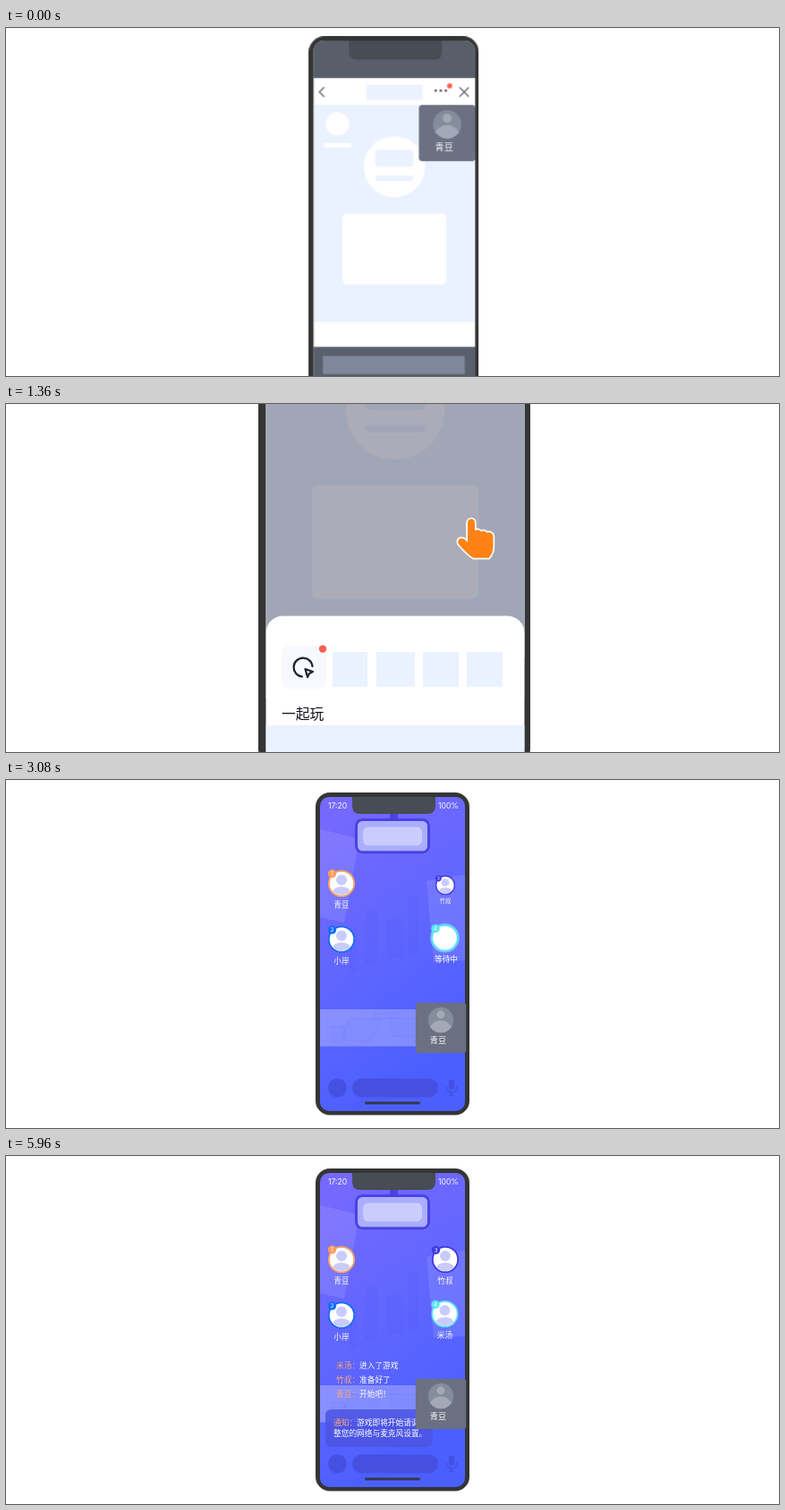
These frames come from a looping animation (864x390 px, 6000 ms). An HTML page:

```html
<!DOCTYPE html>
<html lang="zh">
<head>
<meta charset="utf-8">
<title>一起玩</title>
<style>
html, body { margin: 0; width: 100%; height: 100%; overflow: hidden; background: #fff; }
svg { display: block; width: 864px; height: 390px; }
text { font-family: "Noto Sans CJK SC", "Noto Sans CJK", sans-serif; }
.mid { text-anchor: middle; }
.small { font-size: 8.7px; fill: #fff; }
.name { fill: #ffa67c; }
.latin { font-family: Inter, Roboto, sans-serif; }
.pale { fill: #eaf2ff; }
.white { fill: #fff; }
.line { fill: none; stroke: #686b7d; stroke-width: 2.5; stroke-linecap: round; }

/* one loop is 6 s, so 1% is 60 ms */
.a { animation: 6s linear infinite both; }
#page { animation-name: page; }
#shade { animation-name: shade; }
#sheet { animation-name: sheet; }
#hand { animation-name: hand; }
#tap { animation-name: tap; transform-origin: 521px 128px; }
#game { animation-name: game; }
#seat3 { animation-name: seat3; transform-origin: 491px 123px; }
#wait { animation-name: wait; }
#seat4 { animation-name: seat4; transform-origin: 491px 177px; }
#bubble { animation-name: bubble; transform-origin: 473px 176.5px; }
#log { animation-name: log; }
#say1 { animation-name: say1; }
#say2 { animation-name: say2; }
#say3 { animation-name: say3; }
#say4 { animation-name: say4; }
#notice { animation-name: notice; }

@keyframes page {
  0% { transform: translate(162.1px, -9px) scale(.625); opacity: 1; animation-timing-function: ease-in-out; }
  7% { transform: translate(0, 0) scale(1); }
  16% { transform: translate(0, 0) scale(1); animation-timing-function: ease-in-out; }
  22%, 34% { transform: translate(0, -256px) scale(1); animation-timing-function: ease-in-out; }
  36.6%, 41.333% { transform: translate(0, -307px) scale(1); animation-timing-function: linear; }
  46.6% { opacity: 1; }
  46.667%, 100% { transform: translate(186.45px, -2.41px) scale(.5658); opacity: 0; }
}
@keyframes shade { 0%, 16% { opacity: 0; } 21%, 100% { opacity: 1; } }
@keyframes sheet {
  0%, 16% { transform: translateY(180px); animation-timing-function: ease-out; }
  22%, 100% { transform: none; }
}
@keyframes hand {
  0%, 5.5% { transform: translate(0, 70px); opacity: 0; animation-timing-function: ease-out; }
  10.6%, 23.333% { transform: translate(0, 0); opacity: 1; }
  34% { transform: translate(-130px, 98px); }
  36.667% { transform: translate(-168px, 111px); }
  41.333% { transform: translate(-168px, 111px); opacity: 1; }
  43%, 100% { transform: translate(-168px, 111px); opacity: 0; }
}
@keyframes tap {
  0%, 12.67% { transform: scale(.4); opacity: 0; }
  13.333% { transform: scale(1); opacity: 1; }
  16% { transform: scale(1.3); opacity: 0; }
  37.2% { transform: scale(.4); opacity: 0; }
  38% { transform: scale(1); opacity: 1; }
  41%, 100% { transform: scale(1.3); opacity: 0; }
}
@keyframes game {
  0%, 41.333% { transform: translate(-329.5px, -302.7px) scale(1.7674); }
  42% { opacity: 0; }
  0% { opacity: 0; }
  45%, 100% { opacity: 1; }
  46.667%, 100% { transform: translate(0, 0) scale(1); }
}
@keyframes seat3 { 0%, 48.667% { transform: scale(0); } 52.333%, 100% { transform: scale(1); } }
@keyframes wait { 0%, 60% { opacity: 1; } 62%, 100% { opacity: 0; } }
@keyframes seat4 {
  0%, 60% { transform: scale(.5); opacity: 0; }
  63.5%, 100% { transform: scale(1); opacity: 1; }
}
@keyframes bubble {
  0%, 61.5% { transform: scale(0); opacity: 0; }
  64.5%, 81% { transform: scale(1); opacity: 1; }
  83.5%, 100% { transform: scale(1); opacity: 0; }
}
@keyframes log {
  0%, 52.7% { transform: translateY(61px); animation-timing-function: ease-out; }
  57.5%, 64% { transform: translateY(32.4px); }
  68%, 71.3% { transform: translateY(16.2px); }
  75%, 77.4% { transform: translateY(0); }
  80.5%, 82.7% { transform: translateY(-16.3px); }
  87.5%, 100% { transform: translateY(-42.5px); }
}
@keyframes say1 { 0%, 52.7% { opacity: 0; } 56%, 75.5% { opacity: 1; } 80%, 100% { opacity: 0; } }
@keyframes say2 { 0%, 64% { opacity: 0; } 67%, 100% { opacity: 1; } }
@keyframes say3 { 0%, 71.3% { opacity: 0; } 74.5%, 100% { opacity: 1; } }
@keyframes say4 { 0%, 76% { opacity: 0; } 80%, 100% { opacity: 1; } }
@keyframes notice {
  0%, 82.7% { transform: translateY(45px); opacity: 0; animation-timing-function: ease-out; }
  87.5%, 100% { transform: none; opacity: 1; }
}
</style>
</head>
<body>
<svg viewBox="0 0 864 390" xmlns="http://www.w3.org/2000/svg">
<defs>
  <linearGradient id="sky" x1="0" y1="0" x2=".35" y2="1">
    <stop offset="0" stop-color="#7869fd"/>
    <stop offset=".55" stop-color="#6066ff"/>
    <stop offset="1" stop-color="#4b5fff"/>
  </linearGradient>
  <clipPath id="pageClip"><rect x="290.5" y="37" width="289" height="626" rx="19"/></clipPath>
  <clipPath id="gameClip"><rect x="351" y="19" width="162" height="352" rx="10"/></clipPath>
  <clipPath id="faceClip"><circle r="25.5"/></clipPath>
  <clipPath id="seatClip"><circle r="13"/></clipPath>
  <g id="person" fill="#c9ccfb" clip-path="url(#seatClip)">
    <circle cy="-4" r="6"/>
    <ellipse cy="9" rx="9.5" ry="5.5"/>
  </g>
  <g id="card">
    <rect x="-50.5" y="-35" width="101" height="101" rx="6" fill="#6b7082"/>
    <circle r="25.5" fill="#858c9b"/>
    <g fill="#a3a9b7" clip-path="url(#faceClip)">
      <circle cy="-11" r="8"/>
      <circle cy="25" r="24"/>
    </g>
    <text class="mid white" x="-5.5" y="47" font-size="16.5">青豆</text>
  </g>
</defs>

<g id="page" class="a">
  <rect x="282" y="29" width="304" height="642" rx="28" fill="#343535"/>
  <g clip-path="url(#pageClip)">
    <rect class="white" x="290" y="37" width="290" height="627"/>
    <rect x="290" y="37" width="290" height="67" fill="#595f6a"/>
    <path d="M354 37h166v20q0 14-14 14H368q-14 0-14-14z" fill="#464d54"/>
    <path class="line" d="M309 121l-8 8 8 8M552.5 121.500l15 15m0-15l-15 15"/>
    <rect class="pale" x="385" y="116" width="100" height="27"/>
    <g fill="#555866"><circle cx="509" cy="126.500" r="2.300"/><circle cx="518" cy="126.500" r="2.300"/><circle cx="527" cy="126.500" r="2.300"/></g>
    <circle cx="534" cy="118" r="4.500" fill="#ff5f52"/>
    <rect class="pale" x="292" y="152" width="288" height="389"/>
    <g class="white">
      <circle cx="333" cy="186" r="21"/>
      <rect x="308" y="220" width="50" height="8.500" rx="4"/>
      <circle cx="435" cy="263" r="55"/>
      <rect x="342" y="347" width="186" height="127" rx="7"/>
    </g>
    <rect class="pale" x="401" y="233" width="68" height="30" rx="7"/>
    <rect class="pale" x="401" y="279" width="68" height="9" rx="4.500"/>
    <rect x="290" y="586" width="290" height="80" fill="#595f6c"/>
    <rect x="307" y="602" width="254" height="33" rx="2" fill="#7f889b"/>
    <use href="#card" x="529.500" y="187"/>
    <rect id="shade" class="a" x="290" y="37" width="290" height="627" fill="#585a71" fill-opacity=".5"/>
    <g id="sheet" class="a">
      <rect class="white" x="290.500" y="493.500" width="289" height="190" rx="19"/>
      <rect class="pale" x="290" y="616" width="290" height="50"/>
      <rect x="308" y="527" width="50" height="48" rx="8" fill="#f7f9fe"/>
      <g class="pale">
        <rect x="365" y="534" width="39" height="39"/><rect x="414" y="534" width="43" height="39"/>
        <rect x="466" y="534" width="40" height="39"/><rect x="515" y="534" width="40" height="39"/>
      </g>
      <g fill="none" stroke="#1e2030" stroke-width="2.200" stroke-linejoin="round" stroke-linecap="round">
        <path d="M331 561.500A10.500 10.500 0 1 1 342.500 550"/>
        <path d="M334.500 553l8.500 3-4 2-2 4z"/>
      </g>
      <circle cx="354" cy="530.500" r="4.200" fill="#ff5f52"/>
      <text x="308" y="609" font-size="15.800" font-weight="500" fill="#11131c">一起玩</text>
    </g>
  </g>
</g>

<g id="game" class="a">
  <rect x="346" y="14" width="172" height="361.500" rx="16" fill="#343535"/>
  <g clip-path="url(#gameClip)">
    <rect x="351" y="19" width="162" height="352" fill="url(#sky)"/>
    <g fill="#fff" fill-opacity=".1">
      <path d="M351 55l44 11-17 94-27-6z"/>
      <path d="M470 113l43-7v96l-35 2z"/>
    </g>
    <g fill="#4a50f0" fill-opacity=".16">
      <path d="M384 167h8v48h-8zM401 146h14v60h-14zM426 155h18v44h-18zM450 130h10v66h-10z"/>
    </g>
    <path d="M387 19h93v10q0 9-9 9H396q-9 0-9-9z" fill="#464d54"/>
    <g class="latin" font-size="8.600" fill="#fff">
      <text class="latin" x="360" y="31.500">17:20</text>
      <text class="latin" x="483" y="31.500">100%</text>
    </g>
    <rect x="429" y="38" width="9" height="7" fill="#4a42e0"/>
    <rect x="391.500" y="44.500" width="81" height="36.500" rx="7" fill="#aaaefc" stroke="#4a42e4" stroke-width="3"/>
    <rect x="399" y="52.500" width="66" height="21" rx="6" fill="#caccfd"/>

    <g transform="translate(375 116)">
      <circle r="14.200" fill="#fff" stroke="#ff9d5f" stroke-width="1.800"/><use href="#person"/>
      <circle cx="-10.500" cy="-11" r="4.700" fill="#ff9d5f"/>
      <text class="mid white latin" x="-10.500" y="-8.700" font-size="6">1</text>
      <text class="mid small" y="27">青豆</text>
    </g>
    <g transform="translate(375 178.500)">
      <circle r="14.200" fill="#fff" stroke="#146cf5" stroke-width="1.800"/><use href="#person"/>
      <circle cx="-10.500" cy="-10.500" r="4.700" fill="#146cf5"/>
      <text class="mid white latin" x="-10.500" y="-8.200" font-size="6">2</text>
      <text class="mid small" y="27">小岸</text>
    </g>
    <g id="seat3" class="a"><g transform="translate(491 116)">
      <circle r="14.200" fill="#fff" stroke="#4038e2" stroke-width="1.800"/><use href="#person"/>
      <circle cx="-10.500" cy="-10.500" r="4.700" fill="#4038e2"/>
      <text class="mid white latin" x="-10.500" y="-8.200" font-size="6">3</text>
      <text class="mid small" y="27">竹叔</text>
    </g></g>
    <g transform="translate(490.500 177)">
      <circle r="14.200" fill="#fff" stroke="#5be4f2" stroke-width="1.800"/>
      <circle cx="-10.500" cy="-10.500" r="4.700" fill="#5be4f2"/>
      <text class="mid white latin" x="-10.500" y="-8.200" font-size="6">4</text>
    </g>
    <g id="wait" class="a">
      <circle cx="490.500" cy="177" r="15.500" fill="none" stroke="#7df0fa" stroke-opacity=".5" stroke-width="2"/>
      <text class="mid small" x="492" y="203.500">等待中</text>
    </g>
    <g id="seat4" class="a">
      <use href="#person" x="490.500" y="177"/>
      <text class="mid small" x="490.500" y="203.500">米汤</text>
    </g>
    <g id="bubble" class="a">
      <path d="M435 168.500h32q3 0 3 3v3l3 2-3 2v3q0 3-3 3h-32q-3 0-3-3v-10q0-3 3-3z" fill="#61e4f3"/>
      <text class="mid" x="451" y="179.500" font-size="8" fill="#1d2b57">进入游戏</text>
    </g>

    <rect x="351" y="257" width="162" height="41.500" fill="#fff" fill-opacity=".28"/>
    <g fill="#7f8bff" fill-opacity=".35" stroke="#6c78f5" stroke-opacity=".35">
      <path d="M384 267l36 1-13 25-33-2zM430 267h30v20h-28zM412 261h26v6h-26zM364 276h14v17h-14z"/>
    </g>

    <g id="log" class="a small">
      <g id="say1" class="a"><text x="369" y="264" class="name">竹叔：</text><text x="395" y="264">进入了游戏</text></g>
      <g id="say2" class="a"><text x="369" y="280.300" class="name">米汤：</text><text x="395" y="280.300">进入了游戏</text></g>
      <g id="say3" class="a"><text x="369" y="296.800" class="name">竹叔：</text><text x="395" y="296.800">准备好了</text></g>
      <g id="say4" class="a"><text x="369" y="312.800" class="name">青豆：</text><text x="395" y="312.800">开始吧！</text></g>
    </g>

    <g id="notice" class="a">
      <rect x="357" y="284" width="120" height="42" rx="6" fill="#4c54e2" fill-opacity=".85"/>
      <text class="small" x="366" y="302"><tspan class="name">通知：</tspan>游戏即将开始请调</text>
      <text class="small" x="366" y="314">整您的网络与麦克风设置。</text>
    </g>

    <g fill="#4550e0">
      <circle cx="370.500" cy="345" r="10.500"/>
      <rect x="387" y="334.500" width="96" height="21" rx="10.500"/>
      <rect x="495" y="336" width="6" height="11" rx="3"/>
      <path d="M492 343q0 7 6 7t6-7M498 350v3.500m-3 0h6" fill="none" stroke="#4550e0" stroke-width="1.400"/>
    </g>
    <rect x="401" y="360.500" width="62" height="3" rx="1.500" fill="#34364a"/>
  </g>
  <use href="#card" transform="translate(486 269) scale(.56)"/>
</g>

<g id="hand" class="a">
  <circle id="tap" class="a" cx="521" cy="128" r="13" fill="#ff8c3c" fill-opacity=".6"/>
  <path d="M516 133a4 4 0 0 1 8 0v9q4-2.500 7 1q4-2 6.500 1.200q7-1 7 5V160q0 7-5 12.500h-17Q515 168 506 157q-2-4 1-6q3-1.500 6 1l3 3z"
    fill="#ff8217" stroke="#fff" stroke-width="3.400" stroke-linejoin="round" paint-order="stroke"/>
</g>
</svg>
</body>
</html>
```
